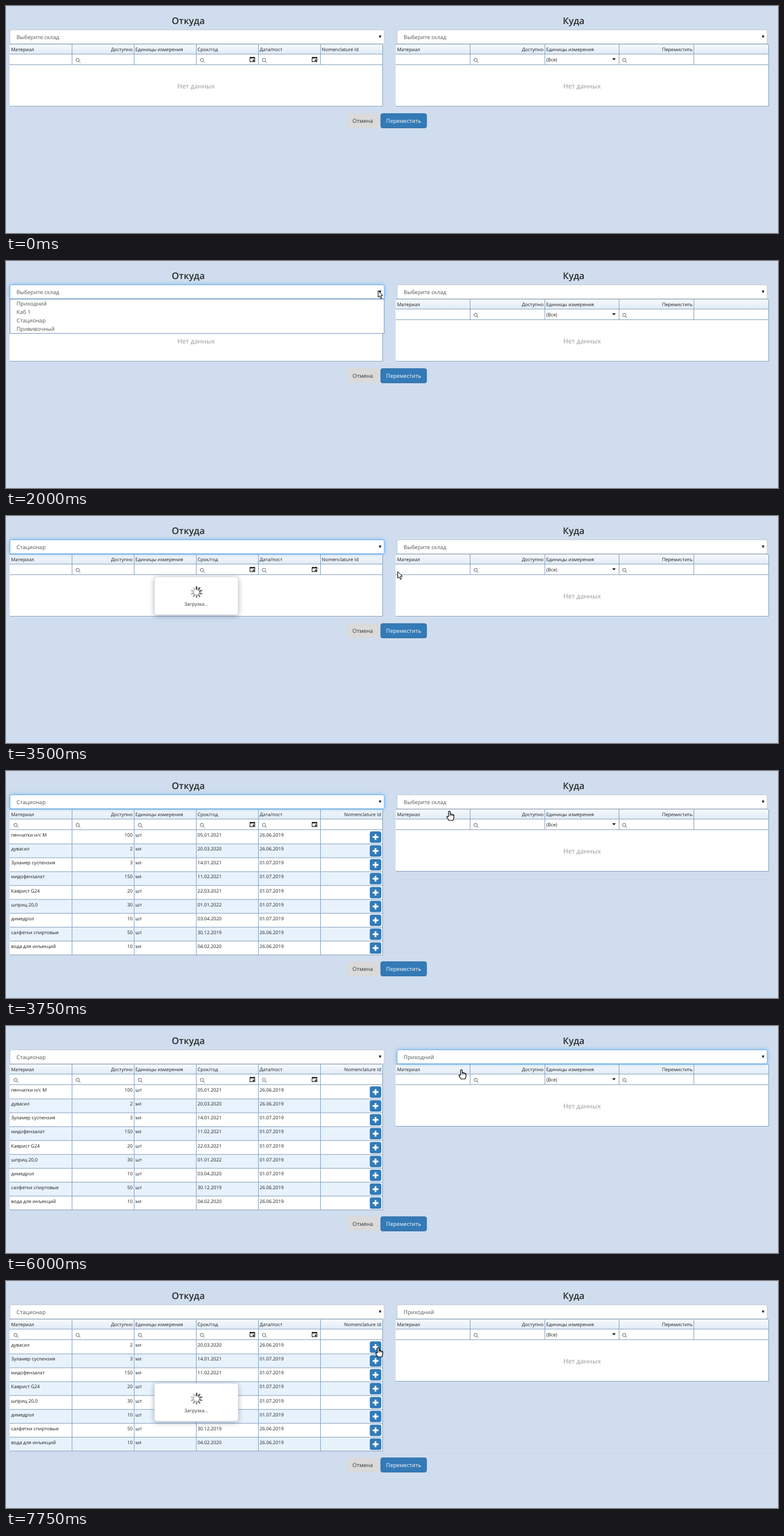
An HTML page with a canvas that plays this animation: 1280 px wide and 377 px high, repeating every 8 s.

```html
<!DOCTYPE html>
<html lang="ru">
<head>
<meta charset="utf-8">
<title>Перемещение материалов</title>
<style>
  html, body { margin: 0; width: 100%; height: 100%; overflow: hidden; background: #d0ddee; }
  canvas { display: block; }
</style>
</head>
<body>
<canvas id="stage" width="1280" height="377"></canvas>
<script>
const ctx = document.getElementById('stage').getContext('2d');
const LOOP = 8000;
const FONT = '"Open Sans", "Noto Sans", sans-serif';
const GRID = 7.85, FORM = 9.07, ROW = 23.05;
const BG = '#d0ddee', LINE = '#8aa4c0', BLUE = '#337ab7', INK = '#1c1c1c';

const stock = [
  ['пенчатки н/с М', 100, 'шт', '05.01.2021', '26.06.2019'],
  ['дувасил', 2, 'мл', '20.03.2020', '26.06.2019'],
  ['Зуламер суспензия', 3, 'мл', '14.01.2021', '01.07.2019'],
  ['мидофензалат', 150, 'мл', '11.02.2021', '01.07.2019'],
  ['Каврист G24', 20, 'шт', '22.03.2021', '01.07.2019'],
  ['шприц 20,0', 30, 'шт', '01.01.2022', '01.07.2019'],
  ['димедрол', 10, 'шт', '03.04.2020', '01.07.2019'],
  ['салфетки спиртовые', 50, 'шт', '30.12.2019', '26.06.2019'],
  ['вода для инъекций', 10, 'мл', '04.02.2020', '26.06.2019']
];
const stores = ['Приходний', 'Каб 1', 'Стационар', 'Прививочный'];
const targets = stores.filter(s => s !== 'Стационар');

// Pointer stops: time, x, y, hand shape
const stops = [
  [1000, 625, 250], [1250, 617, 93], [1500, 616.5, 49],
  [2250, 604, 62], [2500, 602, 71], [2750, 594, 88], [3000, 586, 101],
  [3500, 649, 92], [3750, 735, 66, true], [4000, 751, 53], [4250, 753, 50],
  [5250, 752, 55], [5500, 752, 71], [5750, 752, 73], [6000, 755, 72, true],
  [6500, 683, 99], [6750, 621, 118], [7000, 617, 110, true]
];

function text(str, x, y, size, color = INK, align = 'left', weight = 400) {
  ctx.font = `${weight} ${size}px ${FONT}`;
  ctx.fillStyle = color;
  ctx.textAlign = align;
  ctx.fillText(str, x, y + size * 0.36);
}

function rect(x, y, w, h, color) {
  ctx.fillStyle = color;
  ctx.fillRect(x, y, w, h);
}

function box(x, y, w, h, r, fill, stroke) {
  ctx.beginPath();
  ctx.roundRect(x, y, w, h, r);
  ctx.fillStyle = fill;
  ctx.fill();
  if (stroke) {
    ctx.shadowColor = 'transparent';
    ctx.strokeStyle = stroke;
    ctx.lineWidth = 1;
    ctx.stroke();
  }
}

function shape(points, fill, stroke) {
  ctx.beginPath();
  points.forEach(([x, y]) => ctx.lineTo(x, y));
  ctx.closePath();
  ctx.fillStyle = fill;
  ctx.fill();
  if (stroke) {
    ctx.strokeStyle = stroke;
    ctx.lineWidth = 1;
    ctx.lineJoin = 'miter';
    ctx.stroke();
  }
}

const hline = (x, y, w) => rect(x, y, w, 1, LINE);
const vline = (x, y, h) => rect(Math.floor(x), y, 1, h, LINE);

function triangle(x, y, w, h) {
  shape([[x - w / 2, y - h / 2], [x + w / 2, y - h / 2], [x, y + h / 2]], INK);
}

function select(x, w, value, focus) {
  ctx.save();
  if (focus) {
    ctx.shadowColor = `rgba(82,168,236,${0.75 * focus})`;
    ctx.shadowBlur = 7;
  }
  box(x + 0.5, 39.6, w - 1, 23.2, 2.5, '#fff', focus ? '#66afe9' : '#c3c9d1');
  ctx.restore();
  text(value, x + 11.5, 52, FORM, '#555');
  triangle(x + w - 7.3, 51.2, 4.4, 4.6);
}

function options(x, w, items, active) {
  const h = items.length * 14 + 1;
  box(x + 0.5, 63.3, w - 1, h, 0, '#fff', '#7595ba');
  items.forEach((item, i) => {
    if (i === active) rect(x + 1, 64 + i * 14, w - 2, 14, '#1e90ff');
    text(item, x + 11.5, 71.2 + i * 14, FORM, i === active ? '#fff' : '#555');
  });
}

function lens(x, y) {
  ctx.strokeStyle = '#666';
  ctx.lineWidth = 1;
  ctx.beginPath();
  ctx.arc(x, y, 2.7, 0, 7);
  ctx.moveTo(x + 2, y + 2);
  ctx.lineTo(x + 4.6, y + 4.6);
  ctx.stroke();
}

function calendar(x, y) {
  ctx.strokeStyle = INK;
  ctx.lineWidth = 1;
  ctx.strokeRect(x + 0.5, y + 1.5, 8, 7);
  rect(x, y + 1, 9, 2, INK);
  rect(x + 1.5, y, 1, 1, INK);
  rect(x + 6.5, y, 1, 1, INK);
  rect(x + 5, y + 5, 2.5, 2.5, INK);
}

function gridHead(x, cols, step, heads) {
  const w = 618;
  const grad = ctx.createLinearGradient(0, 64, 0, 80);
  grad.addColorStop(0, '#f6f9fd');
  grad.addColorStop(1, '#e1ebf6');
  rect(x, 64, w, 16, grad);
  rect(x, 80, w, 17, '#fff');
  hline(x, 63, w);
  hline(x, 79.4, w);
  hline(x, 97, w);
  for (let i = 1; i <= cols; i++) vline(x + i * step, 64, 34);
  heads.forEach(([label, right], i) => {
    const at = right ? x + (i + 1) * step - 2 : x + i * step + 2.5;
    text(label, at, 72.2, GRID, INK, right ? 'right' : 'left');
  });
}

function emptyBody(x, label) {
  rect(x, 98, 618, 69, '#fff');
  hline(x, 166, 619);
  vline(x + 618, 98, 69);
  text('Нет данных', label, 133, 10.9, '#999', 'center');
}

function plusButton(x, y, hover) {
  box(x, y, 19, 19, 3.2, hover ? '#286090' : BLUE);
  rect(x + 4.7, y + 8.1, 9.6, 2.8, '#fff');
  rect(x + 8.1, y + 4.7, 2.8, 9.6, '#fff');
}

function sourceGrid(rows, hover) {
  const loaded = rows.length > 0;
  gridHead(6, 6, 103, [
    ['Материал'], ['Доступно', true], ['Единицы измерения'],
    ['Срок/год'], ['Дата/пост'], ['Nomenclature Id', loaded]
  ]);
  for (const i of loaded ? [0, 1, 2, 3, 4] : [1, 3, 4]) lens(15.8 + i * 103, 89.6);
  calendar(404, 84);
  calendar(507, 84);
  if (!loaded) return emptyBody(6, 315);

  rows.forEach((row, i) => {
    const y = 98 + i * ROW;
    rect(6, y, 618, ROW, i % 2 ? '#e8f2fd' : '#fff');
    row.forEach((value, c) => {
      const num = c === 1;
      text(String(value), 6 + c * 103 + (num ? 101 : 2.5), y + 8.5, GRID, INK, num ? 'right' : 'left');
    });
    plusButton(603.2, y + 2.2, hover && i === 0);
  });
  rows.forEach((_, i) => hline(6, 97.5 + (i + 1) * ROW, 619));
  for (let c = 1; c <= 6; c++) vline(6 + c * 103, 98, rows.length * ROW);
}

function targetGrid() {
  gridHead(646, 5, 123.6, [
    ['Материал'], ['Доступно', true], ['Единицы измерения'], ['Перемистить', true]
  ]);
  lens(778.6, 89.6);
  lens(1025, 89.6);
  text('(Все)', 896, 89, GRID);
  triangle(1008, 88.5, 6, 3.4);
  emptyBody(646, 955);
}

function loading(cy) {
  ctx.save();
  ctx.shadowColor = 'rgba(40,60,90,.4)';
  ctx.shadowBlur = 10;
  ctx.shadowOffsetY = 2;
  box(246, cy - 31.5, 139, 63, 4, '#fff', '#d5d9de');
  ctx.restore();
  ctx.save();
  ctx.translate(316, cy - 6);
  ctx.lineWidth = 2.6;
  ctx.lineCap = 'round';
  const n = 10;
  for (let i = 0; i < n; i++) {
    const shade = 80 + i * 13;
    ctx.strokeStyle = `rgb(${shade},${shade},${shade})`;
    ctx.beginPath();
    ctx.moveTo(0, -5.2);
    ctx.lineTo(0, -8.6);
    ctx.stroke();
    ctx.rotate(Math.PI * 2 / n);
  }
  ctx.restore();
  text('Загрузка...', 315.5, cy + 14, GRID, '#333', 'center');
}

function buttons(y) {
  box(565, y, 54, 24, 3, '#dadada');
  text('Отмена', 591.5, y + 12, FORM, '#333', 'center');
  box(621.4, y + 0.3, 75.8, 23.6, 2.8, BLUE, '#2e6da4');
  text('Переместить', 659.3, y + 12, FORM, '#fff', 'center');
}

function arrow() {
  shape([[0.5, 0.5], [0.5, 11.2], [2.9, 9], [4.7, 13.2], [6.6, 12.3], [4.9, 8.3], [8.2, 8.1]], '#fff', '#000');
}

function hand() {
  ctx.beginPath();
  ctx.moveTo(-1.3, 10);
  ctx.lineTo(-1.3, 1.6);
  ctx.quadraticCurveTo(0, -0.5, 1.4, 1.6);
  ctx.lineTo(1.4, 6);
  ctx.quadraticCurveTo(3, 4.6, 3.9, 6.3);
  ctx.quadraticCurveTo(5.4, 5.3, 6.2, 7);
  ctx.quadraticCurveTo(7.7, 6.4, 7.8, 8.2);
  ctx.lineTo(7.6, 12);
  ctx.lineTo(6.2, 16);
  ctx.lineTo(-0.6, 16);
  ctx.lineTo(-4.2, 10.4);
  ctx.quadraticCurveTo(-3.9, 8.2, -1.3, 10);
  ctx.fillStyle = '#fff';
  ctx.fill();
  ctx.strokeStyle = '#000';
  ctx.lineWidth = 1.1;
  ctx.stroke();
  ctx.lineWidth = 0.8;
  ctx.beginPath();
  for (const x of [1.4, 3.9, 6.2]) {
    ctx.moveTo(x, 6.3);
    ctx.lineTo(x, 9);
  }
  ctx.stroke();
}

function pointer(t) {
  const stop = stops.findLast(s => s[0] <= t);
  if (!stop) return;
  ctx.save();
  ctx.translate(stop[1], stop[2]);
  stop[3] ? hand() : arrow();
  ctx.restore();
}

function draw(t) {
  const during = (a, b) => t >= a && t < b;
  const moved = t >= 7750;
  const rows = t < 3750 ? [] : moved ? stock.slice(1) : stock;
  const bottom = rows.length ? 98 + Math.round(rows.length * ROW) : 167;

  rect(0, 0, 1280, 377, BG);
  rect(0, bottom, 1275, 1, '#d8e3f2');
  text('Откуда', 302.2, 24.5, 15.3, '#2b2b2b', 'center', 600);
  text('Куда', 941.2, 24.5, 15.3, '#2b2b2b', 'center', 600);

  sourceGrid(rows, t >= 7000 && !moved);
  targetGrid();
  select(6, 621.6, t < 3250 ? 'Выберите склад' : 'Стационар',
    during(1750, 2000) ? 0.3 : during(2000, 5000) ? 1 : 0);
  select(647.8, 614.8, t < 6000 ? 'Выберите склад' : 'Приходний', during(5000, 7750) ? 1 : 0);
  buttons(bottom + 11.5);

  if (during(2000, 3250)) options(6, 621.6, stores, Math.floor((t - 2500) / 250));
  if (during(5000, 6000)) options(647.8, 614.8, targets, t < 5500 ? -1 : 0);
  if (during(3500, 3750)) loading(132.5);
  if (moved) loading(201.5);
  pointer(t);
}

ctx.textRendering = 'geometricPrecision';
const start = performance.now();
function tick() {
  draw((performance.now() - start) % LOOP);
  requestAnimationFrame(tick);
}
tick();
</script>
</body>
</html>
```
